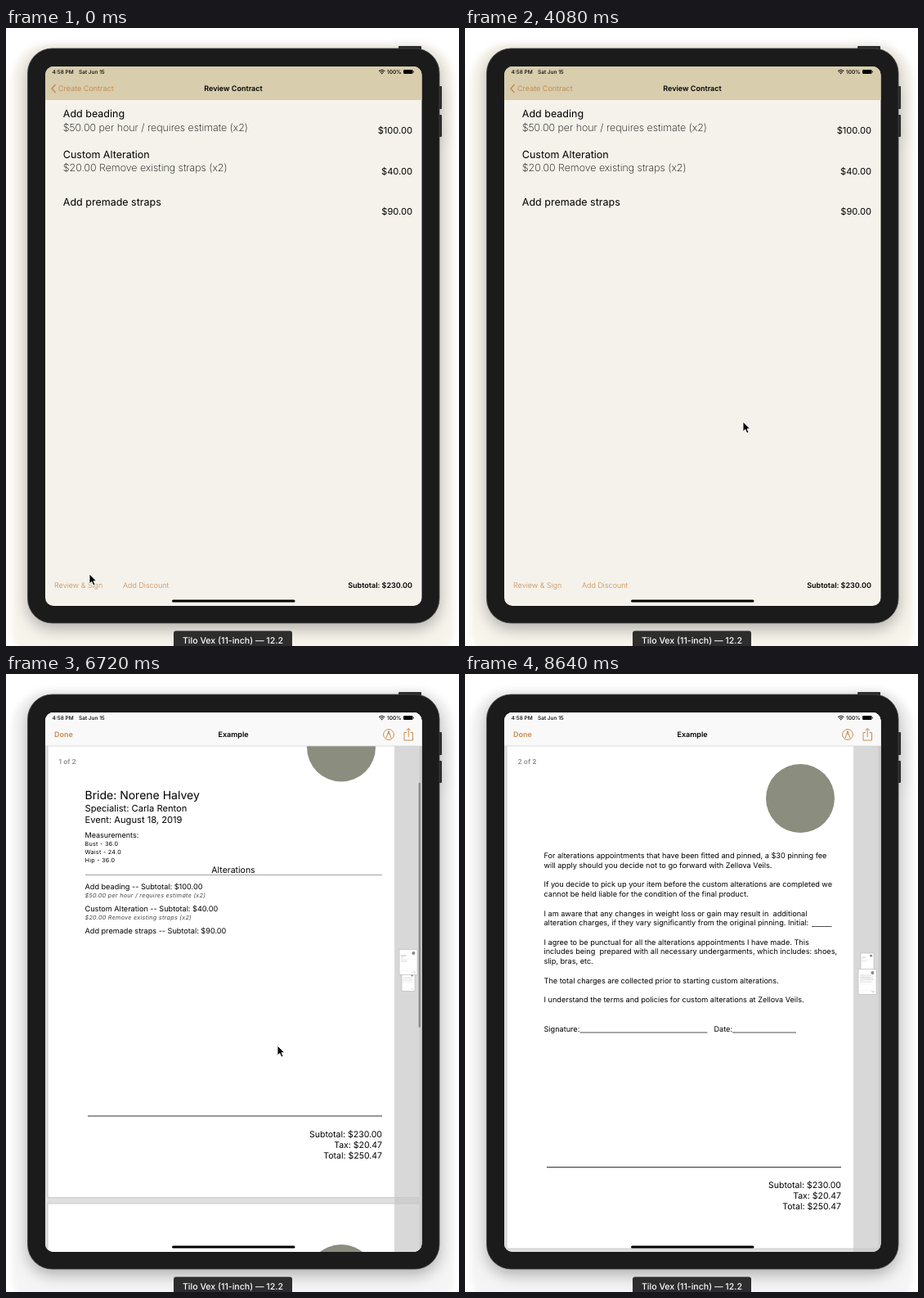
Animation of 554x755 px, one loop 8.96 s. Source, as an HTML page:

```html
<!DOCTYPE html>
<html lang="en">
<head>
<meta charset="utf-8">
<title>Contract review</title>
<style>
html, body { margin: 0; width: 100%; height: 100%; overflow: hidden; background: #fff; }
svg { display: block; }
text { font-family: Inter, Roboto, "Liberation Sans", sans-serif; font-size: 9px; white-space: pre; text-rendering: geometricPrecision; }
.mid { text-anchor: middle; }
.end { text-anchor: end; }
.bold { font-weight: 600; }
.status { font-size: 6.5px; font-weight: 500; }
.item { font-size: 12.5px; }
.thin { font-size: 12.45px; font-weight: 200; }
.price { font-size: 11.1px; }
.tint { fill: var(--tint); }
.light { font-weight: 300; }
.tile { font-size: 6.1px; font-weight: 500; text-anchor: middle; }
.head { font-size: 14px; }
.sub { font-size: 11.15px; }
.sum { font-size: 10.5px; }
.body { font-size: 9.15px; }
.small { font-size: 7.2px; letter-spacing: .29px; }
.note { font-style: italic; fill: #444; }
#device { filter: drop-shadow(0 7px 9px rgba(0,0,0,.28)); }
#halo { filter: blur(3px); }
#card { filter: drop-shadow(0 8px 40px rgba(60,50,25,.2)); }
</style>
</head>
<body>
<svg id="stage" width="554" height="755" viewBox="0 0 554 755"></svg>
<script>
const LOOP = 8960, STEP = 80, PITCH = 649.5;
const $ = id => document.getElementById(id);
const text = (x, y, cls, s) => `<text x="${x}" y="${y}" class="${cls}">${s}</text>`;
const rect = (x, y, w, h, fill, r = 0, more = '') =>
  `<rect x="${x}" y="${y}" width="${w}" height="${h}" rx="${r}" fill="${fill}" ${more}/>`;
const path = (d, fill, more = '') => `<path d="${d}" fill="${fill}" ${more}/>`;
const line = (x1, x2, y, color, w = .8) => path(`M${x1} ${y}H${x2}`, 'none', `stroke="${color}" stroke-width="${w}"`);

// ---- order list
const rows = [
  ['Add beading', '$50.00 per hour / requires estimate (x2)', '$100.00', 108.8],
  ['Custom Alteration', '$20.00 Remove existing straps (x2)', '$40.00', 158.5],
  ['Add premade straps', '', '$90.00', 216.6]
];
const review = `
  ${rect(48, 47, 461, 660, '#f5f2eb')}
  <g id="lines">
    ${Array.from({ length: 11 }, (_, i) => line(58, 509, 137 + i * 49.7, '#e3dfd5')).join('')}
    ${line(48, 509, 667, '#dcd8ce')}${rect(130.6, 676, .7, 10, '#dcd8ce')}
  </g>
  ${rect(48, 47, 461, 41, '#d8cdad')}
  ${path('M60.5 69L56 74L60.5 79', 'none', 'stroke="var(--tint)" stroke-width="1.5"')}
  ${text(64, 77.2, 'tint', 'Create Contract')}
  ${text(278, 77.2, 'mid bold', 'Review Contract')}
  ${rows.map(([name, detail, price, y], i) =>
    text(69.8, y, 'item', name) + text(69.8, y + 16.7, 'thin', detail) +
    text(497, 129 + i * 49.7, 'price end', price)).join('')}
  ${text(59, 684.2, 'tint light', 'Review &amp; Sign')}
  ${text(143, 684.2, 'tint light', 'Add Discount')}
  ${text(497, 684.2, 'end bold', 'Subtotal: $230.00')}`;

// ---- share sheet
const ink = '#5d5c66';
const tile = (x, y, label, icon) =>
  rect(x, y, 42, 42, '#fff', 9) + `<g transform="translate(${x + 21} ${y + 21})">${icon}</g>` +
  text(x + 21, y + 55, 'tile', label);
const doc = (x, y) => path(`M${x} ${y}h6l5 5v11h-11z`, ink, 'stroke="#fff"') +
  path(`M${x + 6} ${y}v5h5`, 'none', 'stroke="#fff"');
const printer = rect(-7, -10, 14, 5, ink, 1) + rect(-11.5, -5.5, 23, 13, ink, 2) +
  rect(-7, 0, 14, 11, '#fff', 1, `stroke="${ink}" stroke-width="1.4"`) +
  line(-4, 4, 4, ink, 1) + line(-4, 4, 7, ink, 1);
const folder = path('M-10.5 -7q0-2 2-2h5l2 2h10q2 0 2 2v1h-21zM-10.5 -3h21v10q0 2-2 2h-17q-2 0-2-2z', ink);
const pdf = path('M-8 -11h10l7 7v15h-17z', ink) + path('M2 -11v7h7', 'none', 'stroke="#fff" stroke-width=".8"') +
  `<text y="3" class="mid bold" style="font-size:6.5px;fill:#aaa">PDF</text>`;
const dots = [-8, 0, 8].map(x => `<circle cx="${x}" r="3.2" fill="${ink}"/>`).join('');
const sheet = `
  <g id="card">${rect(167, 249, 222, 247, '#f5f2ec', 6)}</g>
  ${tile(175, 260, 'More', dots)}
  ${line(167, 389, 329.5, '#cfccc6')}
  ${tile(175, 341, 'Copy', doc(-2, -11) + doc(-9, -5))}
  ${tile(228, 341, 'Print', printer)}
  ${tile(281, 341, 'Save to Files', folder)}
  ${tile(334, 341, 'Create PDF', pdf)}
  ${rect(334, 341, 42, 42, '#000', 9, 'id="press" opacity=".45"')}`;

// ---- document pages, measured from the top of each page
const page = inner => rect(51, 0, 455, 642, '#fff', 0, 'stroke="#c4c4c4" stroke-width=".8"') +
  `<circle cx="410" cy="92" r="42" fill="#8b8d7e"/>` + inner +
  line(100, 460, 542.5, '#333', 1) +
  ['Subtotal: $230.00', 'Tax: $20.47', 'Total: $250.47']
    .map((s, i) => text(460, 568 + i * 13.2, 'sum end', s)).join('');
const order = [
  [155.5, 'head', 'Bride: Norene Halvey'], [170, 'sub', 'Specialist: Carla Renton'],
  [184, 'sub', 'Event: August 18, 2019'], [202.7, '', 'Measurements:'],
  [212.6, 'small', 'Bust - 36.0'], [222.6, 'small', 'Waist - 24.0'], [232.6, 'small', 'Hip - 36.0'],
  [265.6, 'body', 'Add beading -- Subtotal: $100.00'],
  [275.6, 'small note', '$50.00 per hour / requires estimate (x2)'],
  [292.7, 'body', 'Custom Alteration -- Subtotal: $40.00'],
  [302.6, 'small note', '$20.00 Remove existing straps (x2)'],
  [319.5, 'body', 'Add premade straps -- Subtotal: $90.00']
];
const terms = `For alterations appointments that have been fitted and pinned, a $30 pinning fee
will apply should you decide not to go forward with Zellova Veils.

If you decide to pick up your item before the custom alterations are completed we
cannot be held liable for the condition of the final product.

I am aware that any changes in weight loss or gain may result in  additional
alteration charges, if they vary significantly from the original pinning. Initial:

I agree to be punctual for all the alterations appointments I have made. This
includes being  prepared with all necessary undergarments, which includes: shoes,
slip, bras, etc.

The total charges are collected prior to starting custom alterations.

I understand the terms and policies for custom alterations at Zellova Veils.`;
const page1 = page(order.map(([y, cls, s]) => text(96.5, y, cls, s)).join('') +
  text(278, 245, 'sum mid', 'Alterations') + line(97, 460, 248, '#888'));
const page2 = page(terms.split('\n').map((s, i) => text(96.5, 165.2 + i * 11.72, 'body', s)).join('') +
  line(424, 448.5, 248.5, '#222') +
  text(96.5, 377, 'body', 'Signature:') + line(140.5, 296.5, 378, '#222') +
  text(304.5, 377, 'body', 'Date:') + line(327, 405, 378, '#222'));

const thumb = (n, x, y, k) => `<use href="#page${n}" transform="translate(${x} ${y}) scale(${k}) translate(-51 0)"/>` +
  rect(x, y, 455 * k, 642 * k, 'none', 0, 'stroke="#b5b5b5" stroke-width=".6"');
const orange = 'fill="none" stroke="#c98a50" stroke-width="1"';
const preview = `
  ${rect(48, 47, 461, 660, '#dfdfdf')}
  <g id="pages"><use href="#page1"/><use href="#page2" y="${PITCH}"/></g>
  ${rect(475, 88, 34, 620, '#c8c8c8', 0, 'opacity=".7"')}
  <g id="first">${thumb(2, 484, 364.8, .0352)}${thumb(1, 481, 336.5, .0484)}</g>
  <g id="second">${thumb(1, 484, 341, .0352)}${thumb(2, 481, 360.5, .0484)}</g>
  ${rect(504.6, 0, 2.4, 299, '#8b8b8b', 1.2, 'id="scroller"')}
  <text id="count" x="64.5" class="bold" style="font-size:8.4px;fill:#8e8e8e"></text>
  <rect id="bar" x="48" y="47" width="461" height="41"/>
  ${line(48, 509, 88, '#cfcfcf', .7)}
  <g id="tools">
    <text x="59" y="77.2" class="bold" fill="#c98a50">Done</text>
    ${text(278, 77.2, 'mid bold', 'Example')}
    <circle cx="468" cy="74" r="6.4" ${orange}/>
    <path d="M465 78.5L468 69.5L471 78.5M468 70v4" ${orange}/>
    <path d="M490 71.5h-3v9.5h10.5v-9.5h-3M492.2 77v-10.5M489.7 69l2.5-2.5l2.5 2.5" ${orange}/>
  </g>`;

$('stage').innerHTML = `
  <defs>
    <clipPath id="screen">${rect(48, 47, 460.5, 659, '#000', 10)}</clipPath>
    <g id="page1">${page1}</g><g id="page2">${page2}</g>
  </defs>
  ${rect(7, 19, 541, 760, '#f7f4ec', 46, 'id="halo"')}
  <g id="device">
    ${rect(480, 22, 28, 5, '#2b2b2b', 1)}${rect(528, 71, 5, 28, '#2b2b2b', 1)}${rect(528, 106, 5, 27, '#2b2b2b', 1)}
    ${rect(26.5, 25, 503.5, 702, '#1b1b1b', 30, 'stroke="#444" stroke-width=".8"')}
  </g>
  <g clip-path="url(#screen)">
    ${review}<g id="sheet">${sheet}</g><g id="preview">${preview}</g>
    ${text(56.5, 56, 'status', '4:58 PM')}${text(89, 56, 'status', 'Sat Jun 15')}
    ${path('M456 52.6q3.7-3 7.4 0M457.4 54.2q2.3-1.9 4.6 0', 'none', 'stroke="#000" stroke-width="1"')}
    ${path('M458.6 55.2q1.1-.8 2.2 0l-1.1 1.2z', '#000')}
    ${text(466, 56, 'status', '100%')}
    ${rect(486, 51, 11.5, 5, '#000', 1.3)}${rect(498, 52.6, .8, 1.9, '#000', .4)}
    ${rect(203, 698.5, 150.5, 3, '#000', 1.5)}
  </g>
  ${rect(205, 736.5, 145, 24, '#2d2d2d', 3)}
  <text x="277.5" y="751.8" class="mid" fill="#fff" style="font-size:10.6px;font-weight:500">Tilo Vex (11-inch) — 12.2</text>
  ${path('M0 0V12L2.8 9.4L4.8 14L7 13L5 8.7H8.7Z', '#000', 'id="cursor" stroke="#fff" stroke-width=".9"')}`;

// ---- motion: each key is [time, ...values]
const smooth = u => u * u * (3 - 2 * u);
const ramp = (t, a, b) => smooth(Math.min(1, Math.max(0, (t - a) / (b - a))));
function track(keys, t) {
  const i = keys.findIndex(k => k[0] > t);
  if (i < 0) return keys[keys.length - 1].slice(1);
  const a = keys[i - 1], b = keys[i], u = smooth((t - a[0]) / (b[0] - a[0]));
  return a.slice(1).map((v, j) => v + (b[j + 1] - v) * u);
}
const pointer = [
  [0, 102, 667], [800, 102, 667], [1840, 357, 366], [2080, 357, 366], [2400, 359, 364], [3120, 359, 364],
  [4480, 335, 512], [4800, 335, 512], [5840, 331.5, 531.5], [5920, 331.5, 531.5],
  [6720, 332, 454], [7600, 310, 334], [7840, 310, 330], [8400, 540, 300]
];
const pageTop = [
  [0, 108], [4800, 108], [4960, 76.5], [5920, 76.5], [6720, -2.5], [7600, -517.5], [8400, -589.5]
];

function draw(t) {
  const dim = ramp(t, 240, 640) * (1 - ramp(t, 2720, 3040));
  const ready = ramp(t, 4560, 4960);
  const [top] = track(pageTop, t), [x, y] = track(pointer, t);
  const onSecond = top < -250;

  $('stage').style.setProperty('--tint', `color-mix(in srgb, #c68b52, #a5a195 ${dim * 100}%)`);
  $('lines').style.opacity = dim;
  $('sheet').style.opacity = dim;
  $('press').style.display = t >= 2480 ? '' : 'none';

  $('preview').style.display = t >= 4160 ? '' : 'none';
  $('preview').setAttribute('transform', `translate(0 ${660 * (1 - ramp(t, 4160, 4640))})`);
  $('halo').setAttribute('fill', t < 4160 ? '#f7f4ec' : '#f5f5f5');
  $('pages').setAttribute('transform', `translate(0 ${top})`);
  $('first').style.display = onSecond ? 'none' : '';
  $('second').style.display = onSecond ? '' : 'none';
  $('count').textContent = onSecond ? '2 of 2' : '1 of 2';
  $('count').setAttribute('y', 110 + 17 * Math.max(0, top - 76.5) / 31.5);
  $('scroller').setAttribute('y', 97 + (76.5 - top) * .452);
  $('scroller').style.opacity = ramp(t, 5760, 5920) * (1 - ramp(t, 8320, 8560));
  $('bar').setAttribute('fill', `color-mix(in srgb, #ebebeb, #f9f9f9 ${ready * 100}%)`);
  $('tools').style.opacity = .5 + .5 * ready;

  $('cursor').style.display = t < 8400 ? '' : 'none';
  $('cursor').setAttribute('transform', `translate(${x} ${y})`);
}
function tick() {
  draw(Math.floor(performance.now() % LOOP / STEP) * STEP);
  requestAnimationFrame(tick);
}
tick();
</script>
</body>
</html>
```
